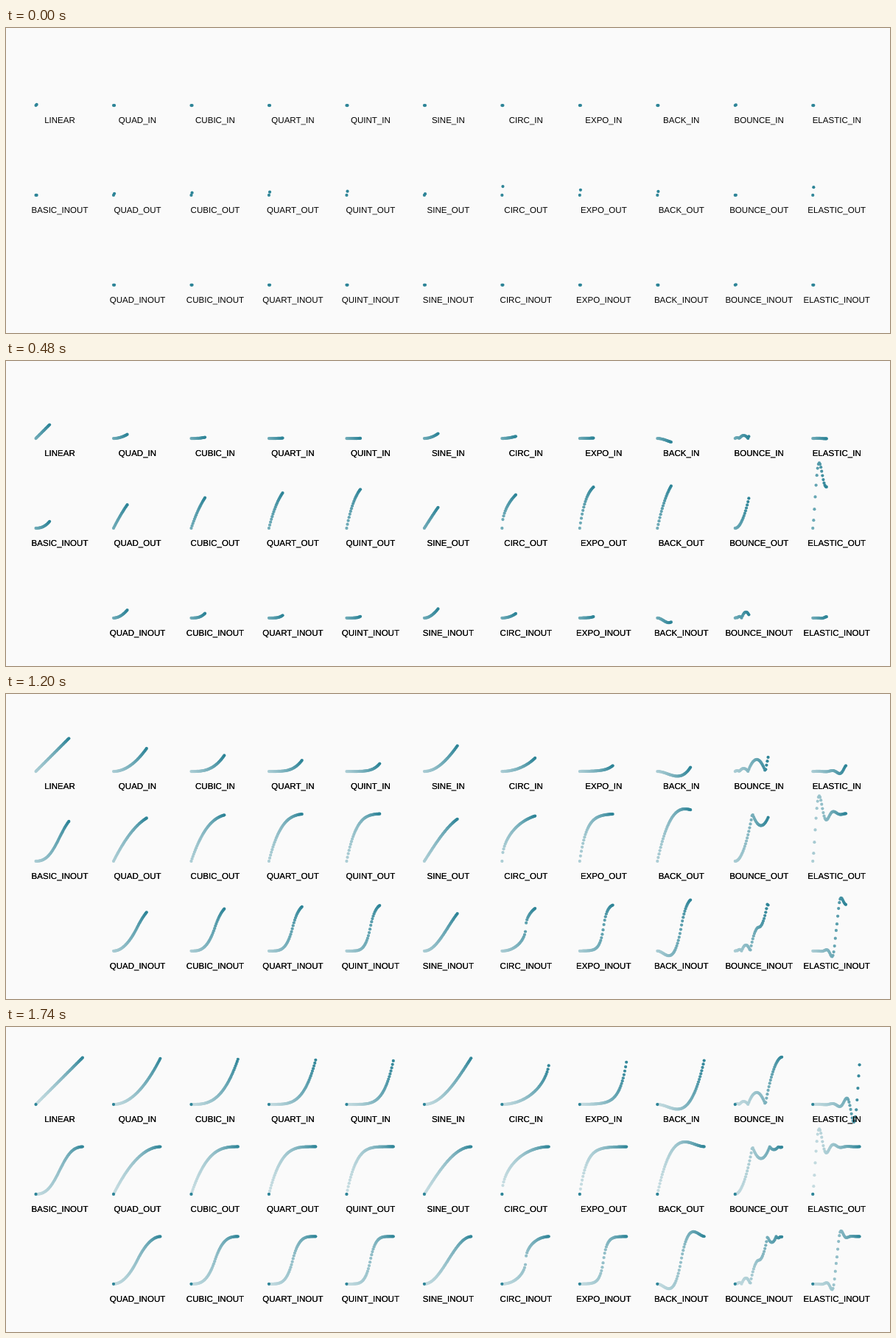
Animation of 1200x414 px, one loop 1770 ms. Source, as an HTML page with a canvas:

```html
<!DOCTYPE html>
<html lang="en">
<head>
<meta charset="utf-8">
<title>Easing curves</title>
<style>
html, body { margin: 0; width: 100%; height: 100%; overflow: hidden; background: #fafafa; }
canvas { display: block; }
</style>
</head>
<body>
<canvas id="stage" width="1200" height="414"></canvas>
<script>
const ctx = document.getElementById('stage').getContext('2d');

const STEPS = 59, STEP_MS = 30;
const SCALE = 1200 / 1024;
const LEFT = 34.6, BASE = 89.65, COLUMN = 90, ROW = 104, SIZE = 55, RADIUS = 1.8;
const PAPER = [250, 250, 250], INK = [45, 132, 151], FADE = 0.977;

const power = n => p => p ** n;
const mirror = ease => p => 1 - ease(1 - p);
const both = ease => p => p < 0.5 ? ease(2 * p) / 2 : 1 - ease(2 - 2 * p) / 2;

const back = s => p => p * p * ((s + 1) * p - s);

const elastic = period => p => p === 0 ? 0 :
  -(2 ** (10 * (p - 1))) * Math.sin((p - 1 - period / 4) * 2 * Math.PI / period);

function bounceOut(p) {
  const k = 2.75;
  if (p < 1 / k) return 7.5625 * p * p;
  if (p < 2 / k) return 7.5625 * (p - 1.5 / k) ** 2 + 0.75;
  if (p < 2.5 / k) return 7.5625 * (p - 2.25 / k) ** 2 + 0.9375;
  return 7.5625 * (p - 2.625 / k) ** 2 + 0.984375;
}

// Each family: name, ease-in, and an optional ease-in for the in-out form.
const families = [
  ['QUAD', power(2)],
  ['CUBIC', power(3)],
  ['QUART', power(4)],
  ['QUINT', power(5)],
  ['SINE', p => 1 - Math.cos(p * Math.PI / 2)],
  ['CIRC', p => 1 - Math.sqrt(1 - p * p)],
  ['EXPO', p => p === 0 ? 0 : 2 ** (10 * (p - 1))],
  ['BACK', back(1.70158), back(1.70158 * 1.525)],
  ['BOUNCE', mirror(bounceOut)],
  ['ELASTIC', elastic(0.3), elastic(0.45)]
];

const charts = [
  { label: 'LINEAR', ease: p => p, column: 0, row: 0 },
  { label: 'BASIC_INOUT', ease: p => p * p / (p * p + (1 - p) ** 2), column: 0, row: 1 }
];
families.forEach(([name, easeIn, wide = easeIn], i) => {
  const column = i + 1;
  charts.push(
    { label: name + '_IN', ease: easeIn, column, row: 0 },
    { label: name + '_OUT', ease: mirror(easeIn), column, row: 1 },
    { label: name + '_INOUT', ease: both(wide), column, row: 2 }
  );
});

function inkAt(age) {
  const strength = FADE ** age;
  return `rgb(${PAPER.map((c, i) => Math.round(c + (INK[i] - c) * strength))})`;
}

function drawDot(ease, step, age) {
  const p = step / STEPS;
  ctx.fillStyle = inkAt(age);
  ctx.beginPath();
  ctx.arc(p * SIZE, -ease(p) * SIZE, RADIUS, 0, 2 * Math.PI);
  ctx.fill();
}

function drawChart({ label, ease, column, row }, frame) {
  ctx.save();
  ctx.translate(LEFT + column * COLUMN, BASE + row * ROW);
  const head = frame + 1;
  for (let step = 0; step <= Math.min(head, STEPS - 1); step++) {
    drawDot(ease, step, head - step);
  }
  if (head === STEPS) drawDot(ease, 0, 0);

  // A second print darkens the letter edges after the first frame.
  ctx.fillStyle = '#000';
  for (let i = 0; i < Math.min(head, 2); i++) ctx.fillText(label, 27.7, 20.6);
  ctx.restore();
}

function draw(frame) {
  ctx.setTransform(1, 0, 0, 1, 0, 0);
  ctx.fillStyle = `rgb(${PAPER})`;
  ctx.fillRect(0, 0, 1200, 414);
  ctx.scale(SCALE, SCALE);
  ctx.font = '9.85px "Liberation Sans", Arial, sans-serif';
  ctx.textAlign = 'center';
  ctx.textRendering = 'geometricPrecision';
  charts.forEach(chart => drawChart(chart, frame));
}

const start = performance.now();
let shown = -1;

function tick() {
  const frame = Math.floor((performance.now() - start) / STEP_MS) % STEPS;
  if (frame !== shown) draw(shown = frame);
  requestAnimationFrame(tick);
}
tick();
</script>
</body>
</html>
```
